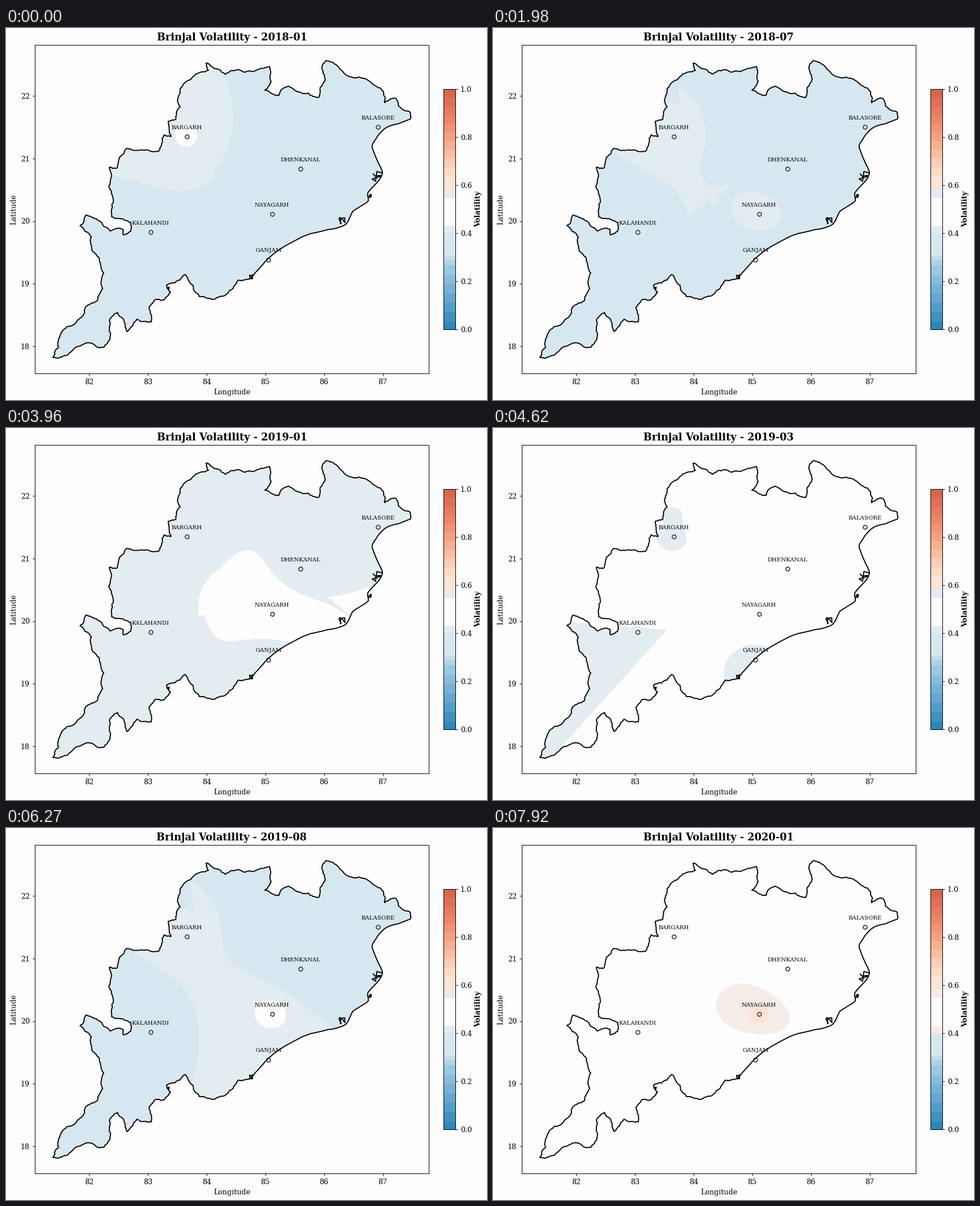
Write a matplotlib script that moves like this. It is 851x658 px and loops after 8 s.

```python
import matplotlib.pyplot as plt
import numpy as np
from matplotlib.animation import FuncAnimation
from matplotlib.colors import to_rgb
from matplotlib.patches import PathPatch
from matplotlib.path import Path

W, H, DPI = 851, 658, 64
K = 91.4 / DPI          # point sizes below are meant for about 91 dpi
HOLD, STEP, LOOP = 330, 40, 8000

plt.rcParams.update({
    "font.family": "DejaVu Serif", "font.size": 10 * K,
    "axes.linewidth": 0.8 * K, "axes.labelpad": 4 * K, "axes.titlepad": 6 * K,
    **{f"{a}tick.major.{key}": val * K for a in "xy"
       for key, val in (("size", 3.5), ("pad", 3.5), ("width", 0.8))},
})

# Stage positions of the markets
MARKETS = {
    "BARGARH": (319.5, 192.3), "BALASORE": (658.3, 175.0),
    "DHENKANAL": (521.3, 248.8), "NAYAGARH": (470.5, 328.6),
    "KALAHANDI": (255.5, 361.0), "GANJAM": (464.3, 409.5),
}

# Volatility of each market, in the order above, at key months
KEYS = {
    0: (.4312, .35, .347, .347, .3886, .36),
    3: (.432, .35, .296, .345, .431, .338),
    6: (.404, .36, .353, .42, .387, .352),
    9: (.399, .38, .362, .478, .391, .378),
    14: (.4293, .46, .444, .47, .4299, .42),
    19: (.403, .36, .35, .439, .382, .405),
    24: (.48, .48, .48, .592, .47, .48),
}
LAST = max(KEYS)

BANDS = [.307, .40, .43, .545, .583]
LOW, COOL, PALE, BEIGE, HOT = "#c5dce9", "#d6e7f0", "#e2ecf1", "#f5ece6", "#fce4d6"
PAPER = "#fdfdfe"

# Corner points of the border, clockwise; detail is added by refine()
COAST = [
    (716, 161), (695, 169), (670, 178), (652, 200), (648, 212), (658, 237),
    (666, 256), (655, 275), (640, 292), (640, 307), (614, 324), (600, 348),
    (568, 357), (530, 367), (484, 392), (458, 414), (433, 443),
]
SOUTHWEST = [
    (433, 443), (411, 446), (390, 471), (364, 480), (342, 475), (331, 455),
    (316, 436), (298, 451), (284, 455), (291, 467), (279, 481), (265, 480),
    (253, 495), (257, 520), (232, 515), (214, 537), (208, 515), (197, 503),
    (183, 518), (184, 550), (173, 565), (150, 557), (115, 573), (83, 583),
    (93, 565), (98, 538), (121, 524), (140, 495), (162, 482), (171, 461),
    (165, 407), (153, 395), (151, 370), (131, 350), (141, 331), (165, 341),
    (184, 359), (207, 356), (208, 366), (220, 360), (221, 344), (187, 334),
]
NORTH = [
    (187, 334), (190, 306), (182, 280), (183, 246), (196, 248), (213, 213),
    (270, 218), (280, 189), (292, 192), (287, 165), (300, 162), (308, 140),
    (308, 107), (317, 96), (358, 75), (354, 62), (369, 72), (388, 82),
    (408, 74), (466, 68), (469, 95), (458, 110), (483, 119), (490, 107),
    (500, 103), (535, 115), (543, 121), (553, 123), (565, 90), (559, 70),
    (566, 58), (607, 86), (668, 113), (670, 132), (681, 125), (690, 125),
    (694, 137), (715, 149), (716, 161),
]
# Creeks and islets: x, y, radius of a dark scribble
CREEKS = [(656, 262, 10), (594, 340, 6), (645, 297, 3), (434, 440, 4), (287, 461, 3)]

rng = np.random.default_rng(7)


def lon(x):
    return 82 + (np.asarray(x) - 147.2) / 103.87


def lat(y):
    return 22 - (np.asarray(y) - 120) / 110.75


def geo(points):
    x, y = np.asarray(points, float).T
    return np.column_stack([lon(x), lat(y)])


def refine(points, round_off, rough, levels=4):
    """Subdivide a polyline, rounding its corners or roughening its sides."""
    pts = np.array(points, float)
    for _ in range(levels):
        ext = np.vstack([pts[0], pts, pts[-1]])
        d = np.diff(pts, axis=0)
        mid = pts[:-1] + d / 2
        mid += round_off * (2 * mid - ext[:-3] - ext[3:])
        mid += d[:, ::-1] * (-1, 1) * rng.uniform(-rough, rough, (len(d), 1))
        out = np.empty((len(pts) + len(mid), 2))
        out[::2], out[1::2] = pts, mid
        pts = out
    return pts


def ramp(stops, n):
    rgb = np.array([to_rgb(c) for c in stops])
    at = np.linspace(0, len(stops) - 1, n)
    return [tuple(np.interp(t, range(len(stops)), ch) for ch in rgb.T) for t in at]


def tints(month):
    pale = BEIGE if month == LAST else PALE
    return [LOW, COOL, pale, PAPER, pale, HOT]


# Inverse-distance weights of the three nearest markets for every grid cell
X0, X1, Y0, Y1 = 80, 720, 52, 590
gx, gy = np.meshgrid(np.arange(X0, X1) + .5, np.arange(Y0, Y1) + .5)
dist2 = np.stack([(gx - x) ** 2 + (gy - y) ** 2 for x, y in MARKETS.values()], axis=-1)
third = np.partition(dist2, 2, axis=-1)[..., 2:3]
weights = np.where(dist2 <= third, 1 / (dist2 + 1e-6), 0)
weights /= weights.sum(axis=-1, keepdims=True)


def field_image(month):
    values = [np.interp(month, list(KEYS), col) for col in zip(*KEYS.values())]
    lut = np.array([to_rgb(c) for c in tints(month)])
    lut = np.round(lut * 255).astype(np.uint8)
    return lut[np.digitize(weights @ values, BANDS)]


images = [field_image(m) for m in range(LAST + 1)]

fig = plt.figure(figsize=(W / DPI, H / DPI), dpi=DPI, facecolor=PAPER)


def place(x0, y0, x1, y1):
    return fig.add_axes([x0 / W, 1 - y1 / H, (x1 - x0) / W, (y1 - y0) / H],
                        facecolor=PAPER)


# Map
ax = place(51, 30, 748, 611)
raster = ax.imshow(images[0], extent=(lon(X0), lon(X1), lat(Y1), lat(Y0)),
                   aspect="auto", interpolation="nearest", zorder=0)
outline = np.vstack([refine(COAST, 1 / 16, .02), refine(SOUTHWEST, 0, .14),
                     refine(NORTH, 0, .12)])
border = PathPatch(Path(geo(outline)), fill=False, lw=1.5 * K, ec="black",
                   joinstyle="round", zorder=2)
ax.add_patch(border)
raster.set_clip_path(border)
for x, y, r in CREEKS:
    scribble = (x, y) + rng.uniform(-r, r, (8, 2))
    ax.plot(*geo(scribble).T, color="black", lw=1.5 * K, zorder=2)
sites = geo(list(MARKETS.values()))
ax.scatter(*sites.T, s=30 * K * K, c="white", edgecolors="black",
           linewidths=K, zorder=1)
for name, (x, y) in zip(MARKETS, sites):
    ax.text(x, y + .1, name, size=8 * K, ha="center", va="bottom", zorder=3)
ax.set(xlim=lon([51, 748]), ylim=lat([611, 30]),
       xticks=range(82, 88), yticks=range(18, 23),
       xlabel="Longitude", ylabel="Latitude")
title = ax.set_title("", size=14 * K, weight="bold")

# Colour bar
cax = place(774, 108, 795, 533)
edges = np.concatenate([[0], np.linspace(.032, .265, 7), [.288], BANDS,
                        np.linspace(.64, 1, 11)])
colors = (ramp(["#2e86bc", "#6dacd2", "#acd3e5"], 8) + tints(0)
          + ramp(["#fddbc7", "#f6b08f", "#ec8468", "#d9654f"], 10))
cells = cax.bar(.5, np.diff(edges), width=1, bottom=edges[:-1],
                color=colors, linewidth=0, antialiased=False)
cax.set(xlim=(0, 1), ylim=(0, 1), xticks=[], yticks=np.arange(6) / 5)
cax.yaxis.tick_right()
cax.yaxis.set_label_position("right")
cax.set_ylabel("Volatility", weight="bold")
cax.yaxis.set_major_formatter("{x:.1f}")


def draw(i):
    month = (i * STEP + STEP - 1) // HOLD
    for cell, tint in zip(cells[8:], tints(month)):
        cell.set_facecolor(tint)
    raster.set_data(images[month])
    title.set_text(f"Brinjal Volatility - {2018 + month // 12}-{month % 12 + 1:02d}")
    return raster, title


anim = FuncAnimation(fig, draw, frames=LOOP // STEP, interval=STEP,
                     repeat=True, repeat_delay=0, cache_frame_data=False)
plt.show()
```
